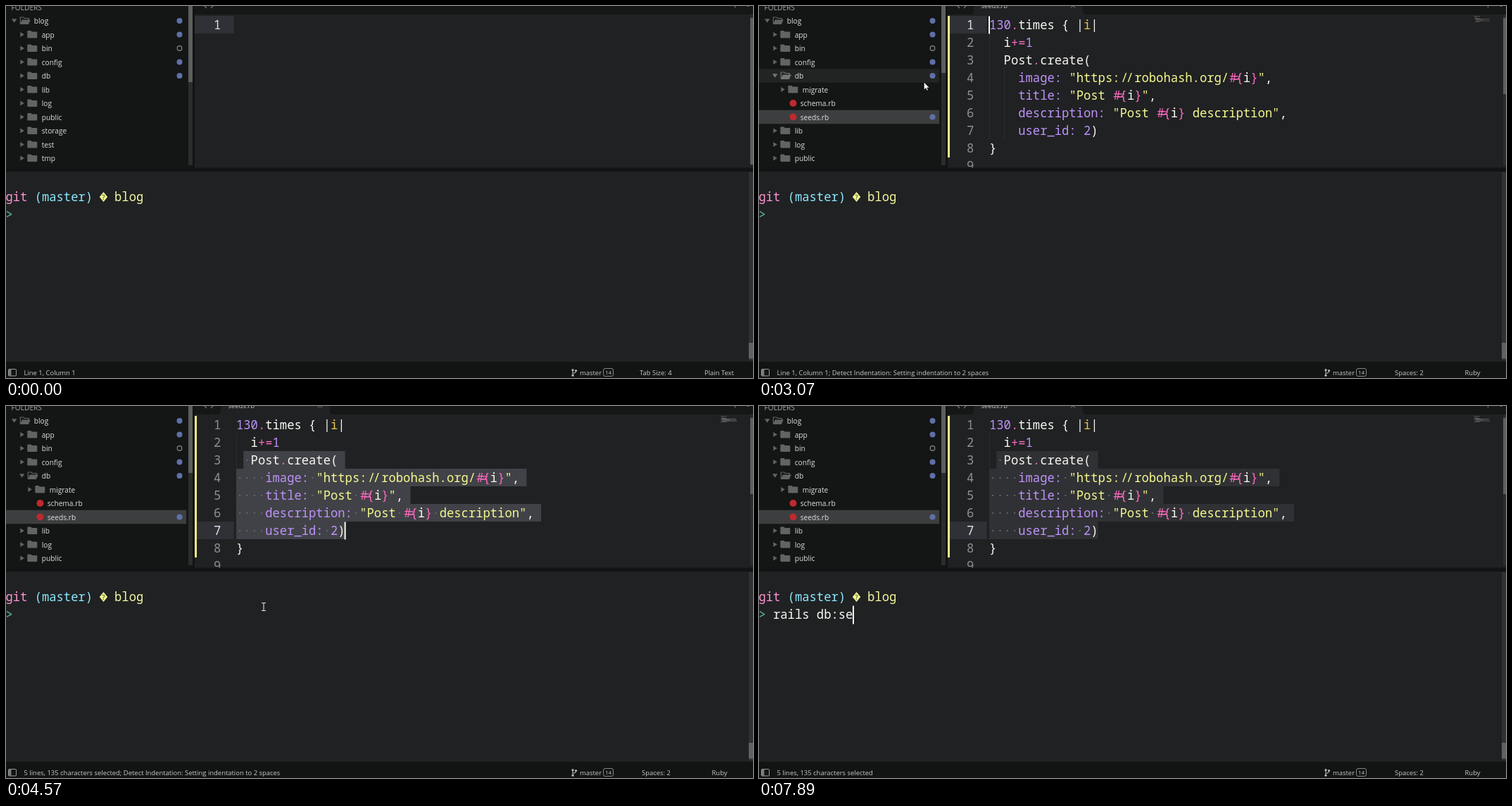
Write an HTML page that moves like this. It is 1061 by 528 pixels and loops after 8000 ms.

```html
<!DOCTYPE html>
<html lang="en">
<head>
<meta charset="utf-8">
<title>Seeding a blog</title>
<style>
  html, body { margin: 0; width: 100%; height: 100%; overflow: hidden; background: #202123; }
  svg { display: block; width: 1061px; height: 528px; }
  text { white-space: pre; }
  .mono { font: 17.18px "Noto Sans Mono", "DejaVu Sans Mono", monospace; font-variant-ligatures: none; }
  .side { font: 10.2px "Open Sans", "Noto Sans", sans-serif; }
  .bar { font: 9.45px "Open Sans", "Noto Sans", sans-serif; }
</style>
</head>
<body>
<svg id="stage" viewBox="0 0 1061 528"></svg>
<script>
const LOOP = 8000, CW = 10.31, LH = 25, ROW = 19.5;
const CODE_X = 327, CODE_Y = 14, TERM_Y = 258;
const INK = { w: '#f8f8f2', p: '#bd93f9', k: '#ff6ac1', y: '#f4f98f', o: '#e6c350' };

const T = { expand: 1780, caret: 1850, open: 2390, pin: 2660, drag: 3490, focus: 4700, hide: 5110, key: 5250, quiet: 6470 };

// Code as [text, ink, nudge] tokens
const interp = [['#', 'k', 1], ['{', 'k'], ['i', 'w'], ['}', 'k']];
const CODE = [
  [['130', 'p'], ['.', 'k'], ['times { |', 'w'], ['i', 'o'], ['|', 'w']],
  [['  i', 'w'], ['+=', 'k'], ['1', 'p']],
  [['  Post', 'w'], ['.', 'k'], ['create(', 'w']],
  [['    image: ', 'p'], ['"https:', 'y'], ['/', 'y', 1.5], ['/', 'y', -1.5], ['robohash.org/', 'y'], ...interp, ['"', 'y'], [',', 'w']],
  [['    title: ', 'p'], ['"Post ', 'y'], ...interp, ['"', 'y'], [',', 'w']],
  [['    description: ', 'p'], ['"Post ', 'y'], ...interp, [' description"', 'y'], [',', 'w']],
  [['    user_id: ', 'p'], ['2', 'p'], [')', 'w']],
  [['}', 'w']]
];
const LINES = CODE.map(line => line.map(tok => tok[0]).join(''));
const SEL_LINE = 3, SEL_COL = 1;

// Time, line and column of the selection's end
const SELECT = [[3490, 3, 1], [3560, 3, 5], [3630, 3, 10], [3700, 4, 2], [3770, 4, 4], [3840, 5, 8], [3910, 6, 11], [3980, 7, 13], [4050, 7, 15]];

const MOUSE = [
  [260, 878, 474], [1010, 98, 84], [1080, 97, 73], [1150, 97, 69], [1560, 92, 106], [1780, 92, 106],
  [2320, 88, 150], [2590, 88, 150], [3350, 341, 78], [3490, 341, 78], [3770, 401, 110],
  [4140, 484, 180], [4360, 484, 180], [4570, 366, 285], [8000, 366, 285]
];
const CLICKS = [[1780, 1920], [2390, 2460], [3490, 4140], [4700, 4770]];

const TYPED = 'rails db:se';
const KEYS = [5390, 5660, 5930, 6130, 6200, 6610, 7010, 7210, 7470, 7670, 7890];

const rect = (x, y, w, h, fill) => `<rect x="${x}" y="${y}" width="${w}" height="${h}" fill="${fill}"/>`;
const path = (d, fill, extra = '') => `<path d="${d}" fill="${fill}" ${extra}/>`;
const stroke = (d, color, w = 1, extra = '') => path(d, 'none', `stroke="${color}" stroke-width="${w}" ${extra}`);
const disc = (x, y, r, fill) => `<circle cx="${x}" cy="${y}" r="${r}" fill="${fill}"/>`;
const text = (x, y, s, fill, cls, extra = '') =>
  `<text x="${x}" y="${y}" fill="${fill}" class="${cls}" ${extra}>${s.replace(/&/g, '&amp;').replace(/</g, '&lt;')}</text>`;
const lineTop = n => CODE_Y + (n - 1) * LH;
const colX = c => CODE_X + c * CW;

function mouseAt(t) {
  if (t < MOUSE[0][0] || t >= KEYS[0]) return null;
  const i = MOUSE.findIndex(k => k[0] > t) - 1;
  const [t0, x0, y0] = MOUSE[i], [t1, x1, y1] = MOUSE[i + 1];
  const p = Math.floor((t - t0) / 70) * 70 / (t1 - t0);
  const e = p * p * (3 - 2 * p);
  return { x: x0 + (x1 - x0) * e, y: y0 + (y1 - y0) * e };
}

function selectionAt(t) {
  const step = SELECT.filter(s => s[0] <= t).pop();
  return step && { line: step[1], col: step[2] };
}

function selectedCount(sel) {
  let n = sel.col - SEL_COL;
  for (let l = SEL_LINE; l < sel.line; l++) n += LINES[l - 1].length + 1;
  return n;
}

function folder(x, y, open, fill) {
  if (!open) return path(`M${x} ${y - 4.5}q0-1 1-1h4l1.5 1.5h6.5q1 0 1 1v7q0 1-1 1h-12q-1 0-1-1z`, fill);
  return stroke(`M${x + 1} ${y + 4}v-9h4.5l1.5 1.5h6v2.5`, fill, 1.2) + path(`M${x + .5} ${y + 5}l3-6.5h12l-3 6.5z`, fill);
}

function sidebar(t, mouse) {
  const open = t >= T.expand;
  // name, depth, kind (f folder, o open folder, r file), badge
  const rows = [['blog', 0, 'o', 1], ['app', 1, 'f', 1], ['bin', 1, 'f', 2], ['config', 1, 'f', 1], ['db', 1, open ? 'o' : 'f', 1]];
  if (open) rows.push(['migrate', 2, 'f'], ['schema.rb', 2, 'r'], ['seeds.rb', 2, 'r', 1]);
  for (const name of ['lib', 'log', 'public', 'storage', 'test', 'tmp']) rows.push([name, 1, 'f']);

  let out = rect(0, 0, 268, 232, '#141515') + text(7.5, 6, 'FOLDERS', '#a5a6a6', 'side', 'font-weight="700"');
  rows.slice(0, 11).forEach(([name, depth, kind, badge], i) => {
    const y = 21 + i * ROW, x = depth * 11, top = y - ROW / 2;
    const hover = mouse && mouse.x < 256 && mouse.y >= top && mouse.y < top + ROW;
    const picked = name === 'seeds.rb' && t >= T.open;
    if (hover || picked) out += rect(0, top, 256, ROW, picked ? '#3d3e40' : '#222424');
    if (kind === 'r') {
      out += disc(48.5, y, 5, '#bd2a2f');
    } else {
      const gray = hover ? '#747575' : '#626363';
      out += kind === 'o' ? path(`M${x + 8} ${y - 2.8}h7.4l-3.7 5.6z`, gray) : path(`M${x + 9.3} ${y - 3.5}l5.6 3.5l-5.6 3.5z`, gray);
      out += folder(x + 19.3, y, kind === 'o', gray);
    }
    out += text(kind === 'r' ? 58.7 : 39.7 + x, y + 4, name, '#dedede', 'side');
    if (badge === 1) out += disc(246.5, y, 4, '#6070a8');
    if (badge === 2) out += `<circle cx="246.5" cy="${y}" r="3.3" fill="none" stroke="#858787" stroke-width="1.2"/>`;
  });
  return out + rect(259, 0, 6, 226, '#2b2c2c') + rect(259, 0, 6, open ? 95 : 108, '#5d5e5e') + rect(265, 0, 3, 232, '#111212');
}

function codeLine(line, n) {
  const base = lineTop(n) + 19;
  let col = 0, out = '';
  for (const [s, ink, dx = 0] of line) {
    const lead = s.length - s.trimStart().length;
    const x = colX(col + lead) + dx;
    out += text(x, base, s.trim(), INK[ink], 'mono', ink === 'o' ? 'font-style="italic"' : '');
    if (s === '#') out += stroke(`M${x + 6} ${base - 8.2}h7.5M${x + 6} ${base - 4}h7.5`, INK.k, 1.3);
    col += s.length;
  }
  return out;
}

function selection(sel, dim) {
  let out = '';
  for (let l = SEL_LINE; l <= sel.line; l++) {
    const from = l === SEL_LINE ? SEL_COL : 0;
    const to = l === sel.line ? sel.col : LINES[l - 1].length + 1;
    if (to > from) out += rect(colX(from), lineTop(l), (to - from) * CW, LH, dim ? '#303134' : '#414247');
    for (let c = from; c < to; c++) {
      if (LINES[l - 1][c] === ' ') out += disc(colX(c + .5), lineTop(l) + 13, 1.1, '#6d6f74');
    }
  }
  return out;
}

function minimap(sel, dim) {
  let out = '';
  LINES.forEach((s, i) => {
    const y = 14.5 + i * 1.25, lead = s.length - s.trimStart().length;
    if (sel && i + 1 >= SEL_LINE && i < sel.line) out += rect(1015.5, y - .2, s.length * .55, 1.25, dim ? '#34363a' : '#484a50');
    out += rect(1015.5 + lead * .55, y, (s.length - lead) * .55, .6, i > 2 && i < 7 ? '#76706c' : '#77797a');
  });
  return out;
}

function editor(t) {
  const open = t >= T.open, dim = t >= T.focus, sel = selectionAt(t);
  const at = sel || { line: 1, col: 0 };
  let out = rect(268, 0, 793, 12, '#151616') + rect(268, 12, 793, 218, '#202123');
  out += stroke('M285-3l-3 3l3 3M291-3l3 3l-3 3', '#777979', 1.2) + stroke('M1035.5-3v5.5M1051-2l3 3l3-3', '#777979', 1);
  if (open) {
    out += path('M306 0h153l2 12h-157z', '#202123');
    out += text(315.5, 2.5, 'seeds.rb', '#c9caca', 'bar', t < T.pin ? 'font-style="italic"' : '');
    out += stroke('M443-3.5l6 6M449-3.5l-6 6', '#8b8d8d', 1);
  }
  out += rect(268, lineTop(at.line), 55.5, LH, '#303136');
  if (open) {
    out += rect(268, CODE_Y, 3, 201, '#f3f088');
    out += stroke('M327.5 39v150M348.5 89v100', '#36383b', 1, 'stroke-dasharray="1 1"');
  }
  if (sel) out += selection(sel, dim);
  for (let n = 1; n <= (open ? 9 : 1); n++) {
    out += text(295, lineTop(n) + 19, String(n), n === at.line ? '#d9e2ea' : '#8b9198', 'mono');
  }
  if (open) out += CODE.map((line, i) => codeLine(line, i + 1)).join('') + minimap(sel, dim);
  if (t >= T.caret && !dim) out += rect(colX(at.col) - 1, lineTop(at.line) + .5, 2, LH, open ? '#f8f8f2' : '#b9babb');
  return out + rect(1057, 12, 4, 214, '#2b2c2d') + rect(1057, 17, 4, open ? 108 : 208, '#5d5e5f');
}

function terminal(t) {
  const base = TERM_Y + 19, typed = KEYS.filter(k => k <= t).length;
  let out = rect(0, 229.5, 1061, 6, '#121313') + rect(0, 235, 1061, 270, '#202123');
  const put = (col, row, s, fill) => text(col * CW - .6, base + row * LH, s, fill, 'mono');
  out += put(0, 0, 'git', '#ff92d0') + put(4, 0, '(master)', '#8be9fd') + put(15, 0, 'blog', '#f4f99d');
  out += path('M138.5 264l5.7 7l-5.7 7l-5.7-7z', '#f1f58c');
  out += text(138.5, 274.5, '?', '#202123', 'bar', 'text-anchor="middle" font-weight="700"');
  out += put(0, 1, '>', '#5cc4b0') + put(2, 1, TYPED.slice(0, typed), '#f8f8f2');
  if (typed) out += rect((2 + typed) * CW - 1.1, TERM_Y + 25.5, 2, 26, '#f8f8f2');
  else if (t >= T.focus && (t < T.hide || t >= T.key)) out += rect(370, TERM_Y, 2, 27, '#f8f8f2');
  return out + rect(1055, 236, 6, 267, '#303132') + rect(1055, 478, 6, 22.5, '#606162');
}

function statusText(t) {
  const detect = t >= T.open && t < T.quiet ? '; Detect Indentation: Setting indentation to 2 spaces' : '';
  const sel = selectionAt(t);
  if (!sel) return 'Line 1, Column 1' + detect;
  const n = selectedCount(sel), lines = sel.line - SEL_LINE + 1;
  if (!n) return `Line ${sel.line}, Column ${sel.col + 1}${detect}`;
  return `${lines > 1 ? lines + ' lines, ' : ''}${n} characters selected${detect}`;
}

function statusBar(t) {
  const open = t >= T.open, put = (x, s) => text(x, 524, s, '#c6c8c8', 'bar');
  let out = rect(0, 505, 1061, 23, '#121313');
  out += '<rect x="3.5" y="515.5" width="11" height="9.5" rx="1" fill="none" stroke="#9a9c9c"/>' + rect(4, 516, 3.5, 9, '#777979');
  out += put(25.5, statusText(t)) + put(815, 'master');
  out += stroke('M805 517.5v6M809.5 518.5q0 2.5-4.5 2.8', '#b5b7b7', 1.1);
  out += disc(805, 516.7, 1.6, '#b5b7b7') + disc(805, 524.3, 1.6, '#b5b7b7') + disc(809.5, 517.6, 1.6, '#b5b7b7');
  out += '<rect x="848.5" y="514.5" width="14" height="11" rx="2.5" fill="none" stroke="#858787"/>';
  out += text(855.5, 523, '14', '#c6c8c8', 'bar', 'text-anchor="middle" style="font-size:8px"');
  return out + (open ? put(903, 'Spaces: 2') + put(1002.5, 'Ruby') : put(900, 'Tab Size: 4') + put(992, 'Plain Text'));
}

function pointer(t, mouse) {
  if (!mouse) return '';
  const { x, y } = mouse;
  const down = CLICKS.some(([a, b]) => t >= a && t < b);
  const overText = x > 268 && y > 12;
  const shape = overText
    ? stroke('M-3-5.5h2.3l.7.6l.7-.6h2.3M0-5v10M-3 5.5h2.3l.7-.6l.7.6h2.3', down ? '#e8dc70' : '#e4e4e4', 1.1)
    : path('M0 0v10.5l2.5-2.3l1.7 3.6l1.6-.8l-1.6-3.4h3.3z', '#fff', 'stroke="#111" stroke-width=".5"');
  return (down ? disc(x, y + .8, 8, '#a89c1c') : '') + `<g transform="translate(${x.toFixed(1)} ${y.toFixed(1)})">${shape}</g>`;
}

const stage = document.getElementById('stage');
let shown = '';

function render(t) {
  const mouse = mouseAt(t);
  const next = sidebar(t, mouse) + editor(t) + terminal(t) + statusBar(t) + pointer(t, mouse);
  if (next !== shown) stage.innerHTML = shown = next;
}

const start = performance.now();
function tick() {
  render((performance.now() - start) % LOOP);
  requestAnimationFrame(tick);
}
tick();
</script>
</body>
</html>
```
